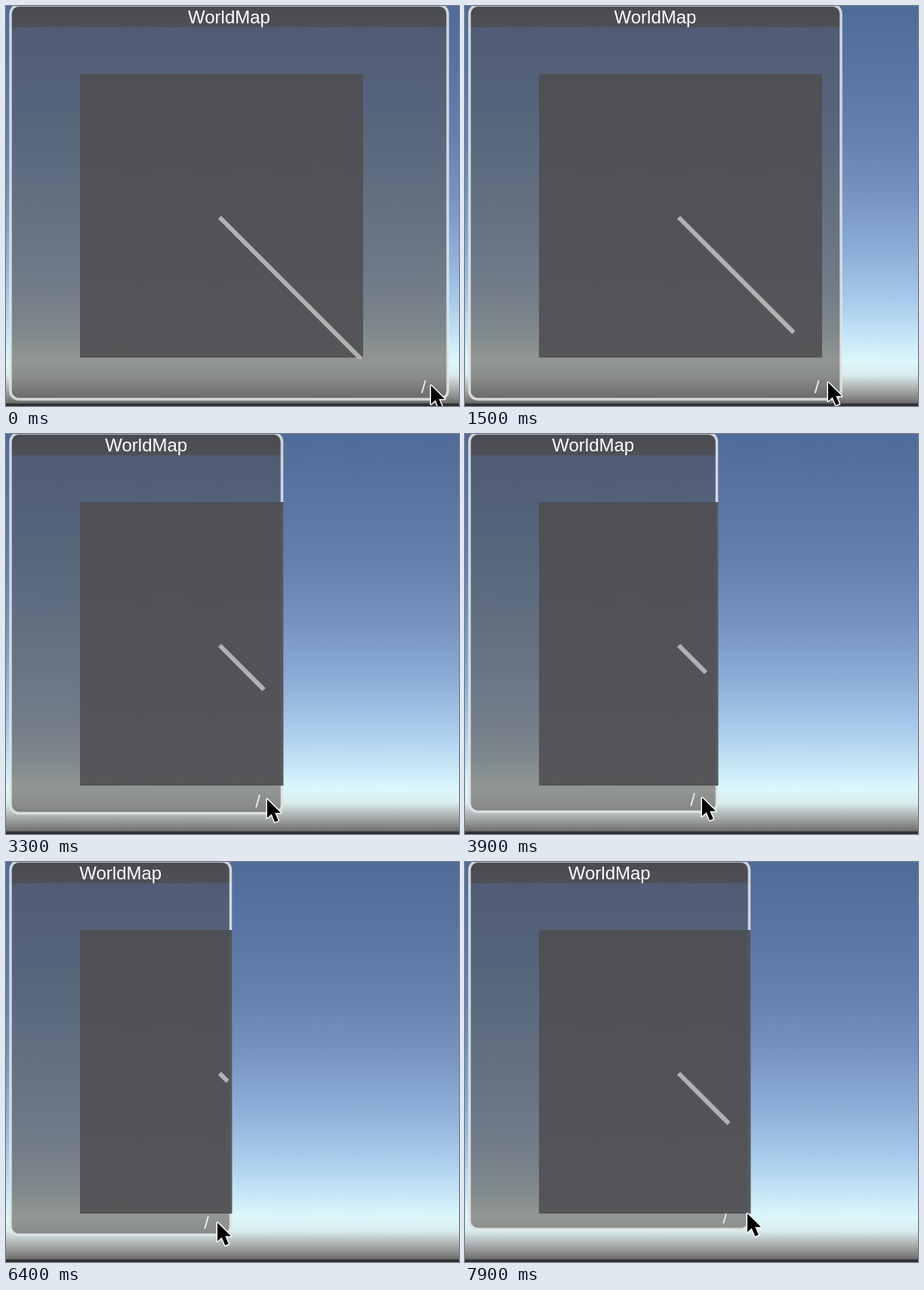
An HTML page with a canvas that plays this animation: 600 by 529 pixels, repeating every 8000 ms.

```html
<!DOCTYPE html>
<html>
<head>
<meta charset="utf-8">
<style>
html, body { margin: 0; width: 100%; height: 100%; overflow: hidden; background: #2f2f31; }
canvas { display: block; }
</style>
</head>
<body>
<canvas id="stage" width="600" height="529"></canvas>
<script>
const ctx = document.getElementById('stage').getContext('2d');
const W = 600, H = 529, LOOP = 8000, STEP = 100;
const LEFT = 4, SQUARE = { x: 98, y: 90, size: 375 };

// time, window right, window bottom, pointer x, pointer y
const KEYS = [
  [0, 587, 522, 562, 501],
  [1500, 500, 522, 480, 497],
  [2600, 419.5, 507, 399, 486],
  [3900, 335.5, 501.5, 313, 480],
  [5500, 305.5, 497, 289, 477],
  [6400, 299.5, 495, 279, 476],
  [7900, 378.5, 487.5, 373, 464]
];

function verticalGradient(stops) {
  const g = ctx.createLinearGradient(0, 0, 0, H);
  for (const [y, color] of stops) g.addColorStop(y / H, color);
  return g;
}

const sky = verticalGradient([
  [0, '#516b98'], [90, '#5a75a4'], [170, '#6580af'], [250, '#7692c1'],
  [330, '#8fafd9'], [390, '#a9cbea'], [430, '#c0e1f4'], [470, '#dcf8fc'],
  [488, '#d9ecec'], [502, '#b5bcbc'], [514, '#949595'], [525, '#6e6e6e'],
  [526, '#343436'], [529, '#2c2c2e']
]);
const glass = verticalGradient([
  [28, '#505c73'], [110, '#54627a'], [200, '#5c6a7e'], [300, '#667483'],
  [380, '#727d89'], [430, '#7f888c'], [470, '#929793'], [490, '#8a8d8b'],
  [505, '#7a7b7b'], [522, '#666667']
]);
const bar = verticalGradient([[0, '#494b51'], [28, '#4e5056']]);
const panel = verticalGradient([
  [90, 'rgba(78,79,84,.95)'], [465, 'rgba(83,83,86,.95)']
]);

// Monotone cubic interpolation of one key column
function sample(t, col) {
  let i = 0;
  while (i < KEYS.length - 2 && t >= KEYS[i + 1][0]) i++;
  const rate = k => (KEYS[k + 1][col] - KEYS[k][col]) / (KEYS[k + 1][0] - KEYS[k][0]);
  const slope = k => {
    if (k === 0) return rate(0);
    if (k === KEYS.length - 1) return rate(k - 1);
    const a = rate(k - 1), b = rate(k);
    return a * b <= 0 ? 0 : 2 * a * b / (a + b);
  };
  const [p, q] = [KEYS[i], KEYS[i + 1]];
  const d = q[0] - p[0], u = (t - p[0]) / d, v = 1 - u;
  return p[col] * v * v * (1 + 2 * u) + q[col] * u * u * (3 - 2 * u)
    + d * u * v * (slope(i) * v - slope(i + 1) * u);
}

function drawWindow(right, bottom) {
  const frame = new Path2D();
  frame.roundRect(LEFT + 2, -1, right - LEFT - 4, bottom - 1, 11);
  ctx.save();
  ctx.clip(frame);
  ctx.fillStyle = glass;
  ctx.fillRect(0, 0, W, H);
  ctx.fillStyle = bar;
  ctx.fillRect(0, 0, W, 28);
  ctx.restore();
  ctx.strokeStyle = 'rgba(226,230,232,.88)';
  ctx.lineWidth = 3.5;
  ctx.stroke(frame);

  ctx.fillStyle = '#fff';
  ctx.font = '24px "Liberation Sans", Arial, sans-serif';
  ctx.textAlign = 'center';
  ctx.fillText('WorldMap', (LEFT + right) / 2, 23);
  ctx.fillStyle = '#eee';
  ctx.fillText('/', right - 34, bottom - 10);
}

function drawMap(right) {
  const { x, y, size } = SQUARE;
  ctx.save();
  ctx.beginPath();
  ctx.rect(x, y, Math.min(size, right - x), size + 2);
  ctx.clip();
  ctx.fillStyle = panel;
  ctx.fillRect(x, y, size, size);

  const reach = Math.min((right - 284.5) / Math.SQRT2, 187.5);
  ctx.strokeStyle = '#b1b1b2';
  ctx.lineWidth = 6;
  ctx.beginPath();
  ctx.moveTo(283, 279.5);
  ctx.lineTo(283 + reach, 279.5 + reach);
  ctx.stroke();
  ctx.restore();
}

const arrow = new Path2D('M1 1V25.5L6.8 20.2L11.2 31L15.8 29L11.3 18.8H19Z');

function drawPointer(x, y) {
  ctx.save();
  ctx.translate(x, y);
  ctx.lineJoin = 'round';
  ctx.lineWidth = 3;
  ctx.strokeStyle = '#fff';
  ctx.stroke(arrow);
  ctx.fillStyle = '#000';
  ctx.fill(arrow);
  ctx.restore();
}

function draw(now) {
  const t = Math.floor(now % LOOP / STEP) * STEP;
  const [right, bottom, px, py] = [1, 2, 3, 4].map(col => sample(t, col));
  ctx.fillStyle = sky;
  ctx.fillRect(0, 0, W, H);
  drawWindow(right, bottom);
  drawMap(right);
  drawPointer(px, py);
}

let start;
function tick(now) {
  start ??= now;
  draw(now - start);
  requestAnimationFrame(tick);
}
requestAnimationFrame(tick);
</script>
</body>
</html>
```
